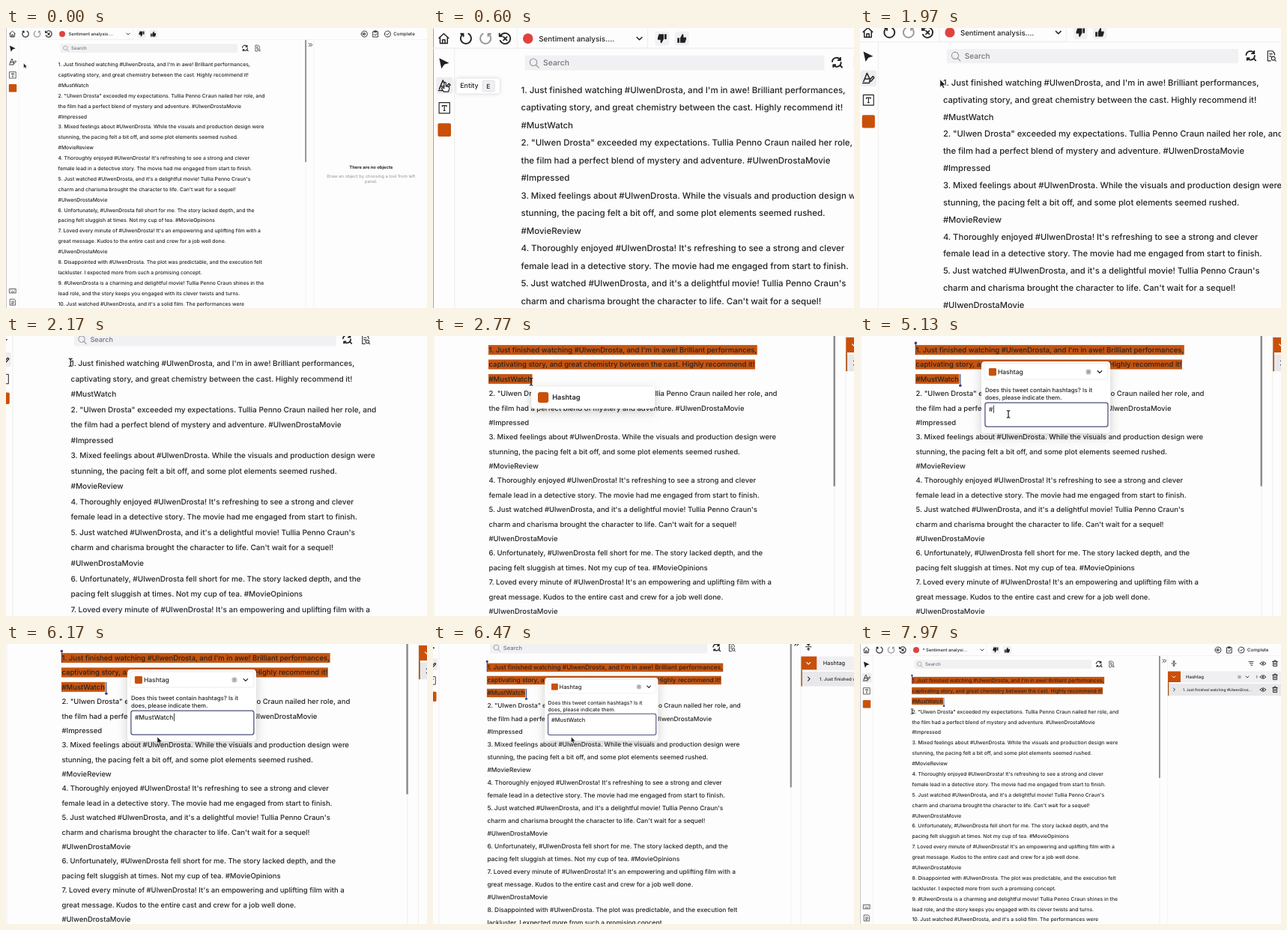
An HTML page that plays this animation: 562x374 px, repeating every 8 s.

```html
<!DOCTYPE html>
<html lang="en">
<head>
<meta charset="utf-8">
<title>Entity annotation</title>
<style>
  html, body { margin: 0; width: 100%; height: 100%; overflow: hidden; background: #fdfdfd; }
  svg { display: block; width: 100%; height: 100%; }
  text { font-family: Inter, "Open Sans", sans-serif; font-weight: 500; fill: #242424; white-space: pre; text-rendering: geometricPrecision; }
  .icon { fill: none; stroke: #242424; stroke-width: .9; stroke-linecap: round; stroke-linejoin: round; }
  .solid { fill: #202020; stroke: none; }
  .bold { stroke-width: 1.15; }
  .thin { stroke-width: .7; }
  .pale { stroke: #96969a; }
  .soft { fill: #f1f1f4; }
  .rule { fill: none; stroke: #f0f0ee; stroke-width: .8; }
  .mark { fill: #c65410; }
  .swatch { fill: #c9500a; }
  .float { fill: #fff; filter: drop-shadow(0 3px 5px rgba(60, 60, 50, .25)); }
  .tip { fill: #fff; filter: drop-shadow(0 .6px 1.6px rgba(60, 60, 60, .25)); }
  .handle { fill: #3c4280; }
</style>
</head>
<body>
<svg viewBox="0 0 562 374" preserveAspectRatio="none"><g id="camera"></g></svg>
<script>
const LOOP = 8000;
const PITCH = 13.89;
const LEFT = 69.5;

const LINES = [
  "1. Just finished watching #UlwenDrosta, and I'm in awe! Brilliant performances,",
  "captivating story, and great chemistry between the cast. Highly recommend it!",
  "#MustWatch",
  "2. \"Ulwen Drosta\" exceeded my expectations. Tullia Penno Craun nailed her role, and",
  "the film had a perfect blend of mystery and adventure. #UlwenDrostaMovie",
  "#Impressed",
  "3. Mixed feelings about #UlwenDrosta. While the visuals and production design were",
  "stunning, the pacing felt a bit off, and some plot elements seemed rushed.",
  "#MovieReview",
  "4. Thoroughly enjoyed #UlwenDrosta! It's refreshing to see a strong and clever",
  "female lead in a detective story. The movie had me engaged from start to finish.",
  "5. Just watched #UlwenDrosta, and it's a delightful movie! Tullia Penno Craun's",
  "charm and charisma brought the character to life. Can't wait for a sequel!",
  "#UlwenDrostaMovie",
  "6. Unfortunately, #UlwenDrosta fell short for me. The story lacked depth, and the",
  "pacing felt sluggish at times. Not my cup of tea. #MovieOpinions",
  "7. Loved every minute of #UlwenDrosta! It's an empowering and uplifting film with a",
  "great message. Kudos to the entire cast and crew for a job well done.",
  "#UlwenDrostaMovie",
  "8. Disappointed with #UlwenDrosta. The plot was predictable, and the execution felt",
  "lackluster. I expected more from such a promising concept.",
  "9. #UlwenDrosta is a charming and delightful movie! Tullia Penno Craun shines in the",
  "lead role, and the story keeps you engaged with its clever twists and turns.",
  "10. Just watched #UlwenDrosta, and it's a solid film. The performances were"
];

const text = (x, y, size, content, attrs = "") =>
  `<text x="${x}" y="${y}" font-size="${size}" ${attrs}>${content}</text>`;
const rect = (x, y, w, h, attrs, r = 0) =>
  `<rect x="${x}" y="${y}" width="${w}" height="${h}" rx="${r}" ${attrs}/>`;
const icon = (x, y, d, cls = "") =>
  `<path class="icon ${cls}" transform="translate(${x} ${y})" d="${d}"/>`;
const group = (id, content) => `<g id="${id}">${content}</g>`;

// Icon outlines, each drawn around its own centre.
const SHAPES = {
  home: "M-3.8-.4L0-3.9L3.8-.4M-2.9-1V3.8H2.9V-1M-1 3.8V1H1V3.8",
  redo: "M2-3.8A4.2 4.2 0 1 1-2-3.8M2-3.8V-1.8M2-3.8H4",
  undo: "M-2-3.8A4.2 4.2 0 1 0 2-3.8M-2-3.8V-1.8M-2-3.8H-4",
  restore: "M-3.6-2.4A4.2 4.2 0 1 1-3.9 1.7M-4.5-3.9V-1.9H-2.5M-1.3-1.3L1.3 1.3M1.3-1.3L-1.3 1.3",
  thumb: "M-3.4-.5H-1.8V3.4H-3.4ZM-1.2-.4L.5-3.6Q1.8-3.6 1.3-.9H3.4Q3.8-.7 3.5 .6L2.6 3.4H-1.2Z",
  down: "M-2-1L0 1L2-1",
  right: "M-1-2L1 0L-1 2",
  circle: "M-4 0A4 4 0 1 0 4 0A4 4 0 1 0-4 0",
  bars: "M-1.8-1.3V1.3M0-1.5L1.8 0L0 1.5Z",
  check: "M-1.7 0L-.4 1.4L1.9-1.2",
  board: "M-3.2-3.2H3.2V4H-3.2ZM-1.3-4.2H1.3V-2.6H-1.3Z",
  lens: "M-3 -.6A2.8 2.8 0 1 0 2.6-.6A2.8 2.8 0 1 0-3-.6M1.8 1.5L4 3.8",
  refresh: "M-3.5-.8A3.4 3.4 0 0 1 2.8-2.2M3-3.8V-1.9H1.1M3.4-.2A3.4 3.4 0 0 1-2.6 2M-2.7 3.4V1.8H-1M2.6 2L4.2 3.7",
  doc: "M2.8-.8V-2L1-4H-2.8V4H-.4M-1.3-1.6H.8M-1.3 .2H0M.2 2A1.5 1.5 0 1 0 3.2 2A1.5 1.5 0 1 0 .2 2M2.8 3.1L3.8 4.1",
  pointer: "M-3.6-4L4.2-.2L.4 1L-1.8 4.2Z",
  entity: "M-3.6 2.8L-.8-4L1.6 1M-2.6 .6H.6M-4.2 4H1.2M1.2 3L1.6 1.2L4-1.4L5-.4L2.7 2.3Z",
  letter: "M-4.2-4.2H4.2V4.2H-4.2ZM-1.7-1.1V-1.9H1.7V-1.1M0-1.9V2.1M-.6 2.1H.6",
  keys: "M-4.2-2.8H4.2V2.8H-4.2ZM-2.6-1H-2.4M-.1-1H.1M2.4-1H2.6M-2 1.2H2",
  page: "M-3.4-4H2L3.4-2.6V4H-3.4ZM-1.6-1H1.6M-1.6 .8H1.6M-1.6 2.4H.6",
  collapse: "M-2-2L0 0L-2 2M.6-2L2.6 0L.6 2",
  sort: "M-3 0H3M0-4V-1.5M-1.2-2.6L0-1.5L1.2-2.6M0 4V1.5M-1.2 2.6L0 1.5L1.2 2.6",
  filter: "M-3-2.4H3M-1.6 0H2.4M0 2.4H1.6",
  eye: "M-4 0Q0-4.6 4 0Q0 4.6-4 0M-1 0A1 1 0 1 0 1 0A1 1 0 1 0-1 0",
  trash: "M-3.4-2.6H3.4M-1.2-2.6V-4H1.2V-2.6M-2.5-2.6V3.6H2.5V-2.6M-.8-.6V1.8M.8-.6V1.8",
  cross: "M-1-1L1 1M1-1L-1 1"
};
const pic = (name, x, y, cls) => icon(x, y, SHAPES[name], cls);
const clear = (x, y) =>
  `<circle cx="${x}" cy="${y}" r="2.6" fill="#c4c4c8"/>` + pic("cross", x, y, "pale");

const toolbar =
  rect(0, 0, .6, 374, 'fill="#a4a4a4"') +
  `<path class="rule" d="M0 15.6H562M17 15.6V374M410.6 15.6V374"/>` +
  pic("home", 8.5, 8) + pic("undo", 26, 8, "bold") + pic("redo", 41.5, 8, "bold pale") +
  pic("restore", 57, 8, "bold") +
  rect(66.5, -3, 103, 18.4, 'class="rule"', 2) +
  '<circle cx="75" cy="8" r="4" fill="#e0433f"/>' +
  group("title", text(83.5, 10.3, 5.85, "Sentiment analysis....")) +
  group("titleEdited", text(83.5, 10.3, 5.85, "* Sentiment analysi...")) +
  pic("down", 163, 8) +
  rect(175.4, 2.5, 11.2, 11, 'class="soft"', 2) + rect(191, 2.5, 11.2, 11, 'class="soft"', 2) +
  `<g transform="rotate(180 181 8)">${pic("thumb", 181, 8, "solid")}</g>` + pic("thumb", 196.4, 8, "solid") +
  pic("circle", 478, 8) + pic("bars", 478, 8) + pic("board", 493, 8) + pic("check", 493, 8.6) +
  pic("circle", 509, 8) + pic("check", 509, 8) + text(517, 10.3, 6.2, "Complete") +
  group("toolActive", rect(2.6, 38.6, 13, 13, 'fill="#ededf1"', 2)) +
  pic("pointer", 8.5, 27.5, "solid") + pic("entity", 8.6, 45) + pic("letter", 9, 62.8, "thin") +
  rect(3.8, 74.9, 10.4, 10.6, 'class="swatch"', 1.2) +
  pic("keys", 9, 351, "thin") + pic("page", 9, 366, "thin");

const reader =
  rect(72.5, 21.3, 236.5, 11.8, 'class="soft"', 1.5) + pic("lens", 79.5, 27.3, "thin pale") +
  text(87, 29.4, 6.15, "Search", 'style="fill:#747478"') +
  pic("refresh", 318.8, 27, "bold") + pic("doc", 335.6, 27, "thin") +
  `<path class="rule" d="M400 16V374"/>` + rect(399, 16, 1.8, 163, 'fill="#8d8d8d"') +
  group("marks", [0, 1, 2].map(i =>
    rect(LEFT - .4, 43.9 + i * PITCH, 0, 9.3, 'class="mark"')).join("")) +
  group("lines", LINES.map((line, i) => text(LEFT, 51 + i * PITCH, 6.81, line)).join("")) +
  group("handles",
    rect(69, 42, .8, 11.2, 'class="handle"') + '<circle class="handle" cx="69.4" cy="42" r="1.3"/>' +
    rect(111.6, 71.7, .8, 11, 'class="handle"') + '<circle class="handle" cx="112" cy="82.7" r="1.3"/>');

const panel =
  pic("collapse", 406, 22.5) +
  group("empty",
    text(487, 188.2, 5.8, "There are no objects", 'text-anchor="middle" style="font-weight:700"') +
    ["Draw an object by choosing a tool from left", "panel."].map((line, i) =>
      text(487, 199.6 + i * 7.6, 5.8, line, 'text-anchor="middle" style="fill:#939396;font-weight:400"')).join("")) +
  group("objects",
    pic("sort", 419, 26) + pic("filter", 522, 26) + pic("eye", 538, 26) + pic("trash", 554, 26) +
    rect(428, 36.5, 134, 15, 'fill="#f0f0f2"') + rect(411, 36.5, 17, 14.5, 'class="swatch"') +
    pic("down", 419, 44, "chevron") +
    text(435, 46.2, 6, "Hashtag") + clear(506.5, 44) + pic("down", 517, 44) +
    text(528.5, 46, 5, "1") + pic("eye", 538, 44) + pic("trash", 554, 44) +
    rect(411, 53, 151, 16, 'fill="#e8e8eb"') + rect(411, 51, 1.2, 18, 'fill="#a8500f"') +
    pic("right", 419.5, 61) + text(431, 62.9, 4.9, "1. Just finished watching #UlwenDros...") +
    pic("eye", 538, 61) + pic("trash", 554, 61));

const overlays =
  group("tip",
    rect(18.6, 39.6, 34, 11.8, 'class="tip"', 1.5) + text(21.4, 47, 5.3, "Entity") +
    rect(39.2, 41.2, 9.4, 8.6, 'fill="#f0f0f3" stroke="#dcdce0" stroke-width=".5"', 1) + text(42.2, 47.3, 5, "E")) +
  group("hover",
    rect(.2, 4.8, 118, 21, 'class="float"', 2) + rect(6.4, 9.9, 10.2, 10.2, 'class="swatch"', 2) +
    text(20.2, 17.4, 6.6, "Hashtag", 'style="font-weight:600"')) +
  group("card",
    rect(132.2, 59.6, 123.2, 68.8, 'class="float"', 3) +
    rect(135, 61.7, 118.2, 15, 'class="rule"', 2) + rect(139.3, 66, 7.2, 7.2, 'class="swatch"', 1) +
    text(147.9, 72, 6.1, "Hashtag") + clear(234.6, 69.6) + pic("down", 245.3, 69.6) +
    text(135.7, 89, 5.6, "Does this tweet contain hashtags? Is it") +
    text(135.7, 96.3, 5.6, "does, please indicate them.") +
    rect(135.7, 99, 117.5, 23, 'fill="#fff" stroke="#4a4f7c" stroke-width=".9"', 2) +
    text(139.3, 107.6, 6.1, "", 'id="typed"') + rect(0, 101.6, .6, 7.4, 'id="caret" fill="#202020"'));

const outline = 'fill="#202020" stroke="#fff" stroke-width=".4"';
const cursor = group("cursor",
  group("arrow", `<path ${outline} d="M0 0V6.4L1.5 5.1L2.5 7.3L3.6 6.8L2.7 4.7H4.6Z"/>`) +
  group("hand", '<path fill="#fff" stroke="#202020" stroke-width=".7" d="M-.7-1Q0-2 .7-1V1.6L3 2.2Q3.6 2.6 3.3 4L2.6 6H-1L-2.7 3.4Q-2.8 2.2-.7 3.2Z"/>') +
  group("beam", icon(0, 0, "M-1.3-3.4Q0-3.4 0-2.5Q0-3.4 1.3-3.4M0-2.5V2.5M-1.3 3.4Q0 3.4 0 2.5Q0 3.4 1.3 3.4")));

const $ = id => document.getElementById(id);
$("camera").innerHTML = toolbar + reader + panel + overlays + cursor;
document.querySelector(".chevron").style.stroke = "#fff";

const lineWidths = [...$("lines").children].slice(0, 3).map(el => el.getComputedTextLength() + .8);
const marks = [...$("marks").children];

// Keys: [time, ...values]
const WIDE = [1, 0, 0], TOOLS = [1.692, 0, .6], READING = [1.396, -22.5, -49.2];
const CAMERA = [
  [-40, ...WIDE], [660, ...TOOLS], [1700, ...TOOLS], [2500, ...READING],
  [6120, ...READING], [6860, ...WIDE], [LOOP, ...WIDE]
];
const CURSOR = [
  [0, 23.5, 47], [420, 9.5, 44], [1020, 9.5, 44], [1750, 67, 46], [2050, 67, 46],
  [2560, 110, 79], [3300, 110, 79], [3900, 134.4, 65.2], [4500, 134.4, 65.2],
  [4850, 158, 110], [5300, 158, 110], [5800, 160.8, 124], [6800, 160.8, 124],
  [7450, 69.5, 90], [LOOP, 69.5, 90]
];
const RELEASE = 2560, OPEN = 4450, TYPE = 5050, TYPE_END = 5800, CLOSE = 7500;
const ANSWER = "#MustWatch";

const ease = p => p < .5 ? 4 * p ** 3 : 1 - 4 * (1 - p) ** 3;
const clamp = (v, lo, hi) => Math.min(hi, Math.max(lo, v));
const show = (id, on) => { $(id).style.display = on ? "" : "none"; };

function track(keys, t) {
  const next = Math.max(1, keys.findIndex(key => key[0] >= t));
  const [t0, ...from] = keys[next - 1], [t1, ...to] = keys[next];
  const p = ease(clamp((t - t0) / (t1 - t0), 0, 1));
  return from.map((v, i) => v + (to[i] - v) * p);
}

function drawMarks(t, x, y) {
  const current = t < RELEASE ? clamp(Math.floor((y - 41.5) / PITCH), 0, 2) : 3;
  marks.forEach((mark, i) => {
    let width = 0;
    if (t >= 2050 && i <= current) {
      width = i < current ? lineWidths[i] : clamp(x - LEFT, 0, lineWidths[i]);
    }
    mark.setAttribute("width", width);
  });
}

function drawAnswer(t) {
  const count = Math.floor(clamp((t - TYPE) / (TYPE_END - TYPE), 0, 1) * ANSWER.length);
  $("typed").textContent = ANSWER.slice(0, count);
  $("caret").setAttribute("x", 139.8 + (count ? $("typed").getComputedTextLength() : 0));
  show("caret", t < TYPE_END || (t - TYPE_END) % 1000 < 500);
}

function render(t) {
  const [scale, panX, panY] = track(CAMERA, t);
  const [x, y] = track(CURSOR, t);
  const created = t >= RELEASE;
  const cardOpen = t >= OPEN && t < CLOSE;
  const hand = t > 330 && t < 1130;
  const beam = (t >= 2080 && t < OPEN + 80) || (t > 4750 && t < 5450) || t > 7350;

  $("camera").setAttribute("transform", `translate(${panX} ${panY}) scale(${scale})`);
  $("cursor").setAttribute("transform", `translate(${x} ${y})`);
  $("hover").setAttribute("transform", `translate(${x} ${y})`);
  show("hand", hand);
  show("beam", beam);
  show("arrow", !hand && !beam);
  show("toolActive", t > 330);
  show("tip", t > 450 && t < 1130);
  show("hover", created && t < OPEN);
  show("card", cardOpen);
  show("handles", t >= OPEN);
  show("title", !created);
  show("titleEdited", created);
  show("empty", !created);
  show("objects", created);
  drawMarks(t, x, y);
  if (cardOpen) drawAnswer(t);
}

const start = performance.now();
function frame() {
  render((performance.now() - start) % LOOP);
  requestAnimationFrame(frame);
}
frame();
</script>
</body>
</html>
```
